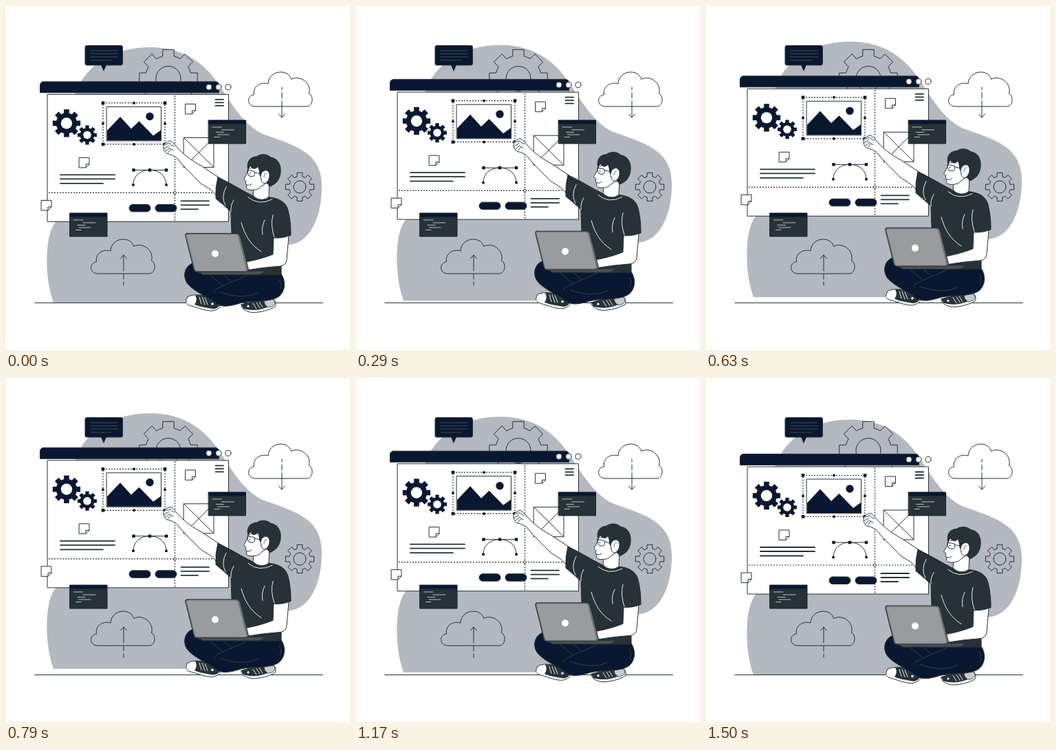
These frames come from a looping animation (500x500 px, 1540 ms). An HTML page with a canvas:

```html
<!DOCTYPE html>
<html lang="en">
<head>
<meta charset="utf-8">
<title>Floating workspace</title>
<style>
html, body { margin: 0; width: 100%; height: 100%; overflow: hidden; background: #fff; }
canvas { display: block; width: 100vw; height: 100vh; }
</style>
</head>
<body>
<canvas id="stage" width="500" height="500"></canvas>
<script>
const ctx = document.getElementById('stage').getContext('2d');
const LOOP = 1540, TICKS = 37, LIFT = 10;
const NAVY = '#091830', DARK = '#263238', GREY = '#b4b8c0', WHITE = '#fff';

function paint(path, fill, stroke, width = 1) {
  const shape = typeof path === 'string' ? new Path2D(path) : path;
  if (fill) { ctx.fillStyle = fill; ctx.fill(shape); }
  if (stroke) { ctx.strokeStyle = stroke; ctx.lineWidth = width; ctx.stroke(shape); }
}

function box(x, y, w, h, fill, stroke, radius = 0) {
  const p = new Path2D();
  p.roundRect(x, y, w, h, radius);
  paint(p, fill, stroke);
}

function disc(x, y, r, fill, stroke) {
  const p = new Path2D();
  p.arc(x, y, r, 0, Math.PI * 2);
  paint(p, fill, stroke);
}

const hline = (x1, x2, y, color, width) => paint(`M${x1} ${y}H${x2}`, null, color, width);

function dotted(path) {
  ctx.save();
  ctx.lineCap = 'butt';
  ctx.setLineDash([2, 2]);
  paint(path, null, DARK, 1.2);
  ctx.restore();
}

function gear(x, y, outer, root, hole, fill, holeFill, stroke) {
  const p = new Path2D(), step = Math.PI / 4, base = 0.25, tip = 0.19;
  for (let i = 0; i < 8; i++) {
    const a = i * step - Math.PI / 2;
    p.arc(x, y, root, a - step + base, a - base);
    for (const t of [-tip, tip]) p.lineTo(x + outer * Math.cos(a + t), y + outer * Math.sin(a + t));
  }
  p.closePath();
  paint(p, fill, stroke, 1);
  disc(x, y, hole, holeFill, stroke);
}

function at(x, y, draw) {
  ctx.save();
  ctx.translate(x, y);
  draw();
  ctx.restore();
}

function cloud(fill) {
  paint('M9 50C-2.5 49.5-3 34 8 33C6 22 16 13.5 28.5 17C29 6 38 0 47 0C55 0 61 5 62 10.5C74 4 92 15 88 31.5C95 34 94 50 85 50Z', fill, DARK);
}

function note(x, y) {
  at(x, y, () => {
    paint('M0 0H14.5V9.5L9.5 14.5H0Z', WHITE, DARK);
    paint('M9.5 14.5V9.5H14.5', null, DARK);
  });
}

function codeWindow(x, y) {
  at(x, y, () => {
    box(0, 0, 54, 34, DARK, '#17232b');
    box(0, 0, 54, 5.5, NAVY);
    [[5.5, 19, 10], [19, 37, 14], [11, 22, 17.5], [13, 30, 21], [8.5, 16, 24.5]]
      .forEach(([a, b, h]) => hline(a, b, h, '#dce0e2', 0.8));
  });
}

function blob() {
  paint('M69 431.5C61 410 58 380 60 355C62 330 68 318 74 312C92 280 100 240 100 200C100 165 90 138 110 108C130 78 165 60 210 60C260 60 290 85 310 115C330 145 345 172 373 186C420 203 459 212 459 262C459 310 440 345 411 347L380 360L300 431.5Z', GREY);
}

function fixedBackdrop() {
  gear(236, 105.5, 43, 33.5, 18, null, null, DARK);
  gear(427, 263, 21, 15.5, 9, null, null, DARK);
  hline(42, 460.5, 431.5, DARK, 1);
  at(352.5, 96, () => cloud(WHITE));
  paint('M401 118V122M401 126V134M401 138V162M396.5 157L401 162L405.5 157', null, DARK);
  at(123.5, 339, () => cloud(null));
  paint('M171 362V385M171 389V397M171 401V406M166.5 367L171 362L175.5 367', null, DARK);
  box(115, 57.5, 54.5, 28.5, NAVY, DARK, 2.5);
  paint('M138 85.5L142 95L146 85.5Z', NAVY);
  [[162, 65], [162, 69.5], [162, 74], [153, 79]].forEach(([x, y]) => hline(123, x, y, '#303a40', 1.6));
}

function picture() {
  dotted('M141 141H231V201H141Z');
  box(146.5, 146.5, 79, 49.5, WHITE, DARK);
  paint('M147 181L166 161L182 178.5L193.5 167.5L214 188.5L225 180.5V195.5H147Z', NAVY);
  disc(209, 160.5, 5.7, NAVY);
  for (const x of [141, 231]) {
    for (const y of [141, 201]) box(x - 2.3, y - 2.3, 4.6, 4.6, NAVY);
    disc(x, 171, 2, NAVY);
  }
  disc(186, 141, 2, NAVY);
  disc(186, 201, 2, NAVY);
}

function panel() {
  box(49.5, 110, 260, 16, NAVY, DARK, [5, 5, 0, 0]);
  [295, 309, 323].forEach(x => disc(x, 118, 4.1, WHITE, DARK));
  box(60.5, 128.5, 263, 185, WHITE, DARK);
  gear(88, 170.5, 20.5, 15.2, 8.2, NAVY, WHITE);
  gear(118, 187.5, 14.2, 10.4, 5.8, NAVY, WHITE);
  dotted('M245.5 130V313');
  dotted('M62 271.5H322');
  disc(245.5, 271.5, 2, WHITE, DARK);
  picture();
  note(261, 142.5);
  note(106.5, 220.5);
  note(51.5, 282.5);
  [136, 140.5, 145].forEach(y => hline(304.5, 316, y, DARK, 1.8));
  [[158, 245.5], [158, 251.5], [141, 258]].forEach(([x, y]) => hline(79, x, y, DARK, 1.8));
  [[295, 283.5], [295, 289.5], [279, 295.5]].forEach(([x, y]) => hline(254.5, x, y, DARK, 1.8));
  [179, 217].forEach(x => box(x, 288.5, 31, 10.5, NAVY, DARK, 5.2));
  paint('M185.5 238.5H233M185 260C185 247 195 238.5 209 238.5S233 247 233 260', null, DARK);
  [185.5, 209, 233].forEach(x => box(x - 2.2, 236.3, 4.4, 4.4, NAVY));
  [185, 233].forEach(x => disc(x, 260, 2, NAVY));
  box(258.5, 191.5, 43.5, 43, null, DARK);
  paint('M258.5 191.5L302 234.5M302 191.5L258.5 234.5', null, DARK);
}

function head() {
  paint('M361 260L359 275C364 283 378 283 382 277L383 256Z', WHITE, DARK);
  paint('M354 230C353 238 351 243 346 251C345 253 348 253 349 254.5C348 257 348 259 350 261C348 265 351 267.5 357 267.5C364 267.5 368 266 371 262L382 255L380 230Z', WHITE, DARK);
  paint('M352 239C348 228 354 218.5 364 218.5C371 213.5 380 215 385 219.5C396 221 401 232 399.5 242C399 252 392 260 383 263C381 259 379 257 375 256L370 248C367 246 369 240 366 234C363 238 358 237 355 233C354 235 353 237 352 239Z', DARK);
  paint('M371 252C368 245 373 238 379 239C385 241 384 253 378 257C374 259 371 256 371 252Z', WHITE, DARK, 0.9);
  paint('M375 249Q375 243 379 243', null, DARK, 0.7);
  paint('M351 238.5L361 240.5Q363 247 358 248L353 247Q350 243 351 238.5M361.5 242L371 244M355 236Q358 234 361 236.5', null, DARK, 1);
  disc(354.5, 243, 0.9, DARK);
  paint('M350 260Q354 262 357 259', null, DARK, 0.9);
}

function pointingArm() {
  paint('M312 251L284 232.5C272 226 262 219 252 209C247 204 243 197 238 196C234 198 230 200 229.5 202.5C228 207 230 212 234 214.5C240 216 246 218 250 223C260 236 272 246 281 256C288 263 299 264 307 278Z', WHITE, DARK);
  paint('M231 201.5L238 199.5Q241 203 245 204M230 207L237 203M232 211L238 206Q239 209 243 209.5M236 213L239 209', null, DARK, 0.9);
}

function legs() {
  paint('M274 373C258 377 256 395 265 405C275 416 294 423 305 432C315 440 330 435 342 431.5C360 428 385 431 397 422C408 412 406 396 398 387L350 384L280 388Z', NAVY, DARK);
  paint('M303 417C300 413 307 411 313 408C326 401 341 397 353 390M295 390L315 406M316 391L327 400M311 416Q345 428 366 417M397 398Q402 404 398 412', null, '#35424c', 0.9);
}

function shoes() {
  paint('M264 423C260 429 261 434 268 435.5C280 439 292 444 301 443C308 441 313 438 311 434C306 427 298 422 286 420.5C278 419.5 268 419.5 264 423Z', WHITE, DARK);
  paint('M275 420.5C290 419 303 425 311 434Q309 439 302 440.5C290 440 281 437 274 434Q279 427 275 420.5Z', DARK);
  paint('M281 423L284 433M285 423L289 434M289 424L293 434M262 431.5Q281 438 302 441', null, WHITE, 0.9);
  disc(300, 433, 1.8, WHITE);
  paint('M342 434C341 440 349 444 357 445.5C370 446 385 441 391 437C393 433 392 428 388 425.5C376 427 360 430 342 434Z', WHITE, DARK);
  paint('M342 434C355 429 366 428 375 427.5Q376 434 381 437.5C370 442 358 443.5 345 440Z', DARK);
  paint('M375 429C384 424 391 426 391 432C389 437 384 438 380 437.5Q375 434 375 429Z', '#c8cacc', DARK, 0.8);
  paint('M364 431L369 439M368 430L373 438M359 432L364 440', null, WHITE, 0.9);
  disc(352, 436.5, 1.6, WHITE);
}

function torso() {
  paint('M308 249C318 253 336 264 356 274.5Q369 284 383 278C399 280 407 286 410 297C413 309 414 320 414 333Q402 338 390 336L390 354L400 374V391H330L327 299Q315 288 305 280Q304 264 308 249Z', DARK, '#1c282e');
  paint('M352 278Q367 291 387 281M320 263Q312 278 319 290M327 299Q326 290 331 282M342 315C347 333 355 347 371 357M376 311Q371 321 373 332M390 336Q384 318 388 304', null, WHITE, 0.9);
}

function laptop() {
  paint('M280 386L376 385Q374 390 366 390.5H286Z', '#4b5053', DARK);
  paint('M263 330.5H336Q339 331 340 334L352.5 383Q352 386.5 348 386.5H276Q273.5 386 273 383L260.5 333Q260.5 330.5 263 330.5Z', '#737678', DARK);
  paint('M264 331.5H334Q337 332 338 335L350 383Q349 385.5 346 385.5H277Q275 385 274 382L262 334Q262 331.5 264 331.5Z', '#999b9c', '#555b5e', 0.7);
  disc(304, 360, 5, WHITE);
}

function person() {
  pointingArm();
  shoes();
  legs();
  torso();
  head();
  paint('M389 337L388 361Q371 368 349 372L350 384Q372 380 400 378Q407 376 408 369L411 334Q401 338 389 337Z', WHITE, DARK);
  laptop();
}

function render(now) {
  const tick = Math.floor((now % LOOP) / LOOP * TICKS);
  const phase = (tick + 1) / TICKS % 1;
  const dy = 0.5 - LIFT * (1 - Math.abs(2 * phase - 1));
  ctx.fillStyle = WHITE;
  ctx.fillRect(0, 0, 500, 500);
  at(0, dy, blob);
  fixedBackdrop();
  at(0, dy, panel);
  codeWindow(294.5, 166);
  codeWindow(93, 301);
  at(0, dy, person);
}

const start = performance.now();
function loop() {
  render(performance.now() - start);
  requestAnimationFrame(loop);
}
ctx.lineJoin = ctx.lineCap = 'round';
loop();
</script>
</body>
</html>
```
